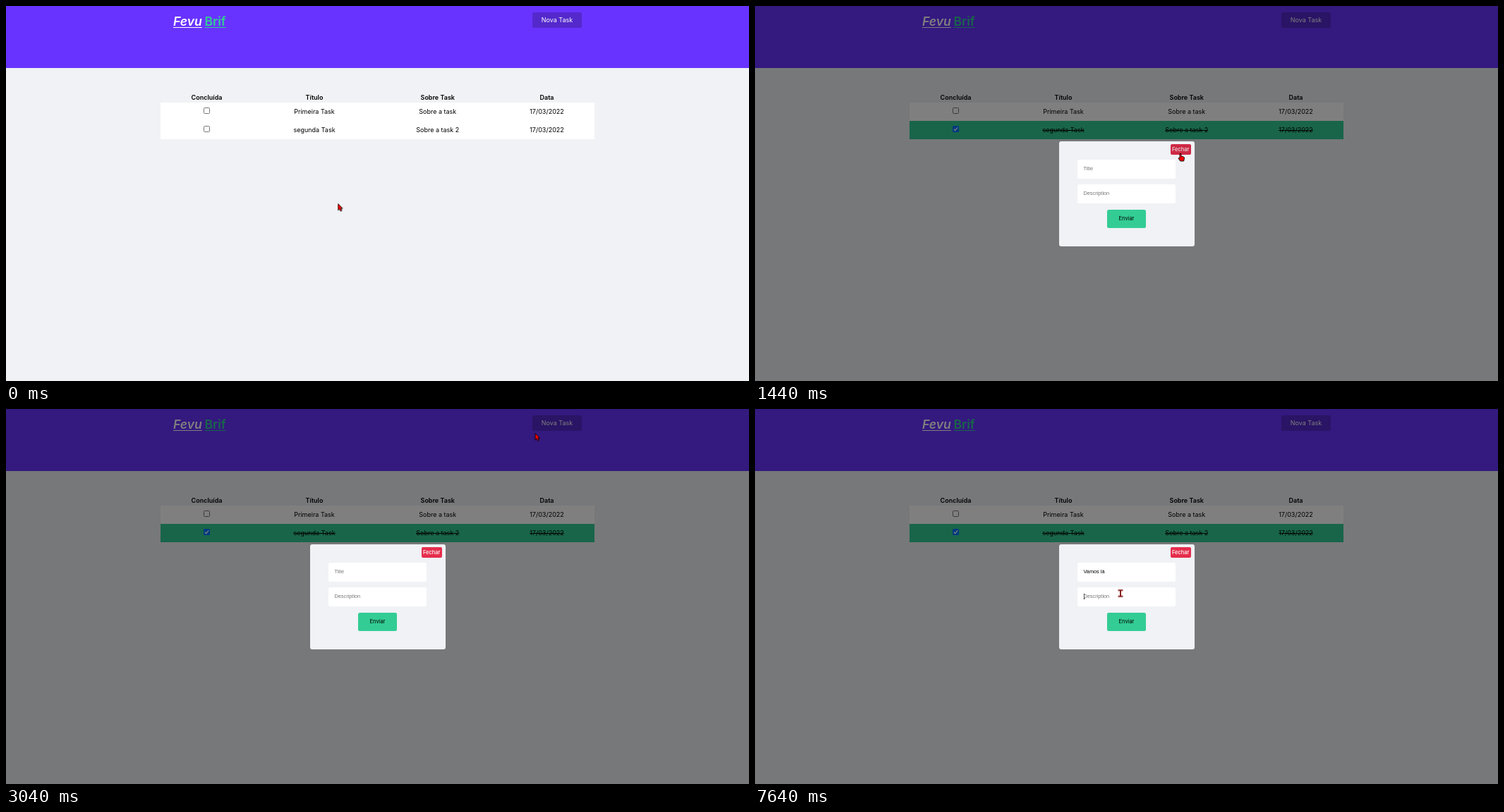
An HTML page that plays this animation: 1053x532 px, repeating every 8000 ms.

```html
<!DOCTYPE html>
<html lang="pt">
<head>
<meta charset="utf-8">
<title>Tarefas</title>
<style>
  * { box-sizing: border-box; }
  html, body { margin: 0; width: 100%; height: 100%; overflow: hidden; }
  body { position: relative; background: #f0f2f5; font: 9px Inter, "Open Sans", sans-serif; color: #000; }
  header, .logo, .btn, .table, .dim, .modal, .field, .cursor, .cursor svg { position: absolute; }

  header { inset: 0 0 auto; height: 88px; background: #6933ff; }
  .logo { top: 10px; font: 600 17.6px/24px Inter, sans-serif; text-decoration: underline 1.4px; text-underline-offset: 1.6px; text-decoration-skip-ink: none; }
  .first { left: 237px; color: #fff; font-style: italic; }
  .second { left: 281.5px; color: #33cc95; }
  .btn { border-radius: 2.5px; text-align: center; white-space: nowrap; }
  .new { left: 746px; top: 9px; width: 70px; height: 22px; line-height: 22px; background: #5429cc; color: #fff; }

  .table { left: 219px; top: 123px; width: 614.5px; }
  .row { display: grid; grid-template-columns: 131px 174px 175.5px 134px; height: 26px; line-height: 26px; text-align: center; background: #fff; }
  .row.head { height: 14px; line-height: 14px; font-weight: 600; background: none; }
  .row i { position: relative; width: 9px; height: 9px; margin: 7px 0 0 61px; border: 1px solid #767676; border-radius: 1.5px; background: #fff; }
  .row i svg { position: absolute; left: -1px; top: -1px; }

  .dim { inset: 0; background: rgba(0, 0, 0, .5); }
  .modal { left: 430.5px; top: 191.5px; width: 192px; height: 149.5px; border-radius: 3px; background: #f0f2f5; }
  .close { left: 158px; top: 4.5px; width: 29.5px; height: 15px; border-radius: 2px; background: #e52e4d; color: #fff; font-size: 7.5px; font-weight: 500; line-height: 15px; }
  .send { left: 68.5px; top: 97px; width: 55px; height: 26.5px; background: #33cc95; font-size: 7.5px; line-height: 26px; }
  .field { left: 26.5px; width: 139px; height: 26.5px; padding-left: 8.5px; border-radius: 2.5px; background: #fff; font: 7.33px/26px "Liberation Sans", Arial, sans-serif; white-space: pre; }
  .title { top: 26.5px; }
  .about { top: 61.5px; }
  .hint { color: #757575; }
  .caret { display: inline-block; width: .8px; height: 8px; margin-right: -.8px; vertical-align: -1.5px; background: #000; }

  .cursor { left: 0; top: 0; }
  .cursor svg { left: 0; top: 0; overflow: visible; fill: #f00; stroke: #000; stroke-width: .9; stroke-linejoin: round; }
  .cursor .beam { stroke: none; fill: #7a0a0a; }

  /* 8 s loop: 1% = 80 ms */
  .new, .done, .done span, .done svg, .close, .dim, .modal, .cursor svg { animation: 8s step-end infinite; }
  .cursor { animation: move 8s step-end infinite; }
  .new { animation-name: newHover; }
  .close { animation-name: closeHover; }
  .done { animation-name: doneRow; }
  .done span { animation-name: strike; }
  .done svg { animation-name: tick; }
  .dim, .modal { animation-name: open; }
  .cursor .arrow { animation-name: arrow; }
  .cursor .hand { animation-name: hand; }
  .cursor .beam { animation-name: beam; }

  @keyframes newHover { 0%, 8.75%, 38% { filter: none; } 6.25%, 33.75% { filter: brightness(.9); } }
  @keyframes closeHover { 0%, 20.5% { filter: none; } 18% { filter: brightness(.9); } }
  @keyframes doneRow { 0% { background: #fff; } 6.25%, 100% { background: #33cc95; } }
  @keyframes strike { 0% { text-decoration: none; } 6.25%, 100% { text-decoration: line-through; } }
  @keyframes tick { 0% { opacity: 0; } 6.25%, 100% { opacity: 1; } }
  @keyframes open { 0%, 20.5% { opacity: 0; } 8.75%, 38%, 100% { opacity: 1; } }
  @keyframes arrow {
    0%, 8.75%, 20.5%, 38%, 92.5% { opacity: 1; }
    6.25%, 18%, 33.75%, 46.4%, 94.2%, 100% { opacity: 0; }
  }
  @keyframes hand { 0%, 8.75%, 20.5%, 38%, 100% { opacity: 0; } 6.25%, 18%, 33.75% { opacity: 1; } }
  @keyframes beam { 0%, 92.5% { opacity: 0; } 46.4%, 94.2%, 100% { opacity: 1; } }
  @keyframes move {
    0% { transform: translate(470.5px, 280.5px); }
    6.25% { transform: translate(772px, 20px); }
    8.75% { transform: translate(767px, 75.5px); }
    10.5% { transform: translate(767px, 75.5px); animation-timing-function: steps(2, jump-start); }
    12.1625% { transform: translate(773px, 84px); animation-timing-function: steps(5, jump-start); }
    16.3375% { transform: translate(655px, 185px); animation-timing-function: steps(3, jump-start); }
    18.8375% { transform: translate(603px, 209px); }
    21.25% { transform: translate(603px, 209px); animation-timing-function: steps(4, jump-start); }
    24.5875% { transform: translate(526.5px, 247px); }
    26.25% { transform: translate(526.5px, 247px); animation-timing-function: steps(10, jump-start); }
    34.6625% { transform: translate(755px, 29px); animation-timing-function: steps(2, jump-start); }
    36.3375% { transform: translate(751.5px, 23.5px); }
    38% { transform: translate(750px, 34.5px); }
    38.75% { transform: translate(750px, 34.5px); animation-timing-function: steps(11, jump-start); }
    47.9125% { transform: translate(534.7px, 232.7px); }
    90.5% { transform: translate(534.7px, 232.7px); animation-timing-function: steps(6, jump-start); }
    95.5%, 100% { transform: translate(518px, 261.5px); }
  }
</style>
</head>
<body>
<header></header>
<div class="logo first">Fevu</div>
<div class="logo second">Brif</div>
<div class="btn new">Nova Task</div>

<div class="table">
  <div class="row head"><span>Concluída</span><span>Título</span><span>Sobre Task</span><span>Data</span></div>
  <div class="row"><i></i><span>Primeira Task</span><span>Sobre a task</span><span>17/03/2022</span></div>
  <div class="row done">
    <i><svg width="9" height="9"><rect width="9" height="9" rx="1.5" fill="#0075ff"/><path d="M1.9 4.7 3.7 6.5 7.2 2.4" fill="none" stroke="#fff" stroke-width="1.3"/></svg></i>
    <span>segunda Task</span><span>Sobre a task 2</span><span>17/03/2022</span>
  </div>
</div>

<div class="dim"></div>
<div class="modal">
  <div class="btn close">Fechar</div>
  <div class="field title"><span id="typed"></span><b class="caret" id="caret1"></b><span class="hint" id="hint">Title</span></div>
  <div class="field about"><b class="caret" id="caret2"></b><span class="hint">Description</span></div>
  <div class="btn send">Enviar</div>
</div>

<div class="cursor">
  <svg class="arrow" width="1" height="1"><path d="M0 0V9.3L2.2 7.4 3.8 10.6 5.5 9.8 4 6.7H6.6Z"/></svg>
  <svg class="hand" width="1" height="1"><path d="M-1 .8Q0-.6 1 .8V4.2L4.6 5Q5.6 5.5 5.4 7L4.7 11H-.2L-2.8 7.4Q-3 6.2-1.8 6.4L-1 7Z"/></svg>
  <svg class="beam" width="1" height="1"><path d="M-3.5-5.2H3.5V-3.6H.9V3.6H3.5V5.2H-3.5V3.6H-.9V-3.6H-3.5Z"/></svg>
</div>

<script>
  const LOOP = 8000;
  const TEXT = "Vamos lá";
  const KEY_TIMES = [4570, 4700, 4840, 5370, 5440, 5770, 6240, 6700];
  const [typed, hint, caret1, caret2] = ["typed", "hint", "caret1", "caret2"].map(id => document.getElementById(id));
  const within = (t, from, to) => t >= from && t < to;
  const show = (el, on) => { el.style.visibility = on ? "inherit" : "hidden"; };
  let start;

  function draw(now) {
    start ??= now;
    const t = (now - start) % LOOP;
    const count = KEY_TIMES.filter(k => k <= t).length;
    typed.textContent = TEXT.slice(0, count);
    show(hint, count === 0);
    show(caret1, within(t, 3840, 4370) || within(t, 4570, 7240));
    show(caret2, t >= 7640);
    requestAnimationFrame(draw);
  }
  requestAnimationFrame(draw);
</script>
</body>
</html>
```
